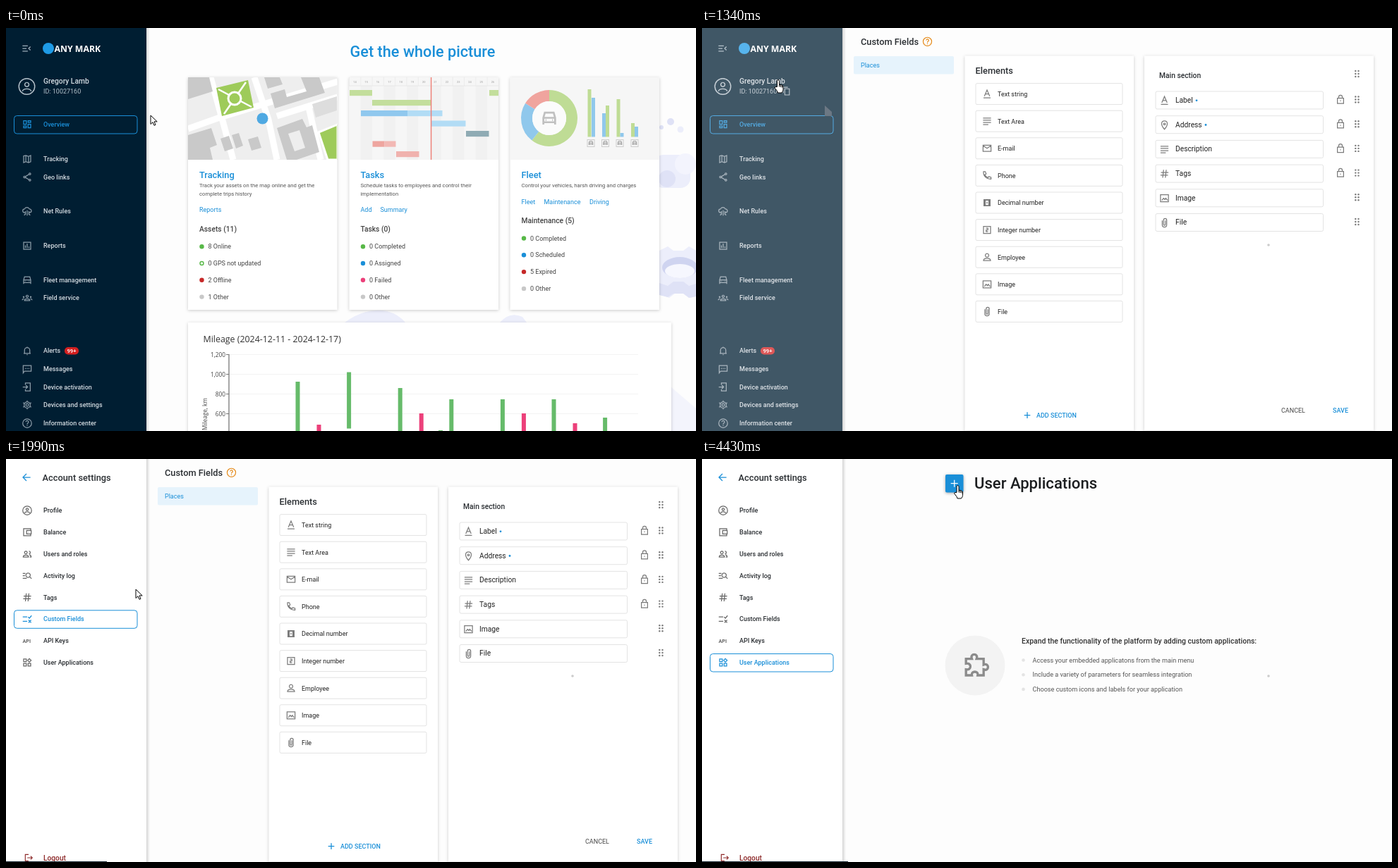
Write an HTML page that moves like this. It is 978x572 px and loops after 4490 ms.

```html
<!DOCTYPE html>
<html lang="en">
<head>
<meta charset="utf-8">
<title>Account settings walkthrough</title>
<style>
html, body { margin: 0; width: 100%; height: 100%; overflow: hidden; background: #fdfdfd; }
svg { display: block; font-family: Roboto, sans-serif; }
.card { fill: #fff; filter: drop-shadow(0 1px 2px rgba(0,0,0,.2)); }
.chart { font-family: "Open Sans", "Noto Sans", sans-serif; }
</style>
</head>
<body>
<svg id="stage" width="978" height="572" viewBox="0 0 978 572"></svg>
<script>
const BLUE = '#1a8fd8', INK = '#2b2f33', GREY = '#7c7c7c';

// 24-unit stroked icons
const icons = {
  menu: 'M3 6h12M3 12h9M3 18h12M21 8l-4 4 4 4',
  user: 'M2 12a10 10 0 1 0 20 0a10 10 0 1 0-20 0M12 7a2.6 2.6 0 1 0 .1 0M6.500 18c1-4 10-4 11 0',
  dash: 'M4 4h6v8H4zM14 4h6v4h-6zM4 16h6v4H4zM14 12h6v8h-6z',
  map: 'M4 5l5-1 6 2 5-2v14l-5 2-6-2-5 2zM9 4v14M15 6v14',
  share: 'M18 3a2 2 0 1 0 .1 0M18 17a2 2 0 1 0 .1 0M6 10a2 2 0 1 0 .1 0M8 11l8-5M8 13l8 5',
  cloud: 'M7 15H6a4 4 0 0 1 0-8a6 6 0 0 1 11 0a4 4 0 0 1 1 8h-1M12 10v12M8 12v7l-3 2M16 12v7l3 2',
  report: 'M4 4h16v16H4zM8 11v6M12 7v10M16 14v3',
  car: 'M4 21v-9l2-7h12l2 7v9M4 12h16M4 18h16M7 15h1M16 15h1',
  group: 'M12 6a2.500 2.500 0 1 0 .1 0M6 18c0-5 12-5 12 0zM4 9a1 1 0 1 0 .1 0M20 9a1 1 0 1 0 .1 0M1 17q0-3 4-3M23 17q0-3-4-3',
  bell: 'M6 18v-7a6 6 0 0 1 12 0v7M4 18h16M11 21h2M12 3v2',
  msg: 'M3 21V4h18v13H6zM7 11h2M11 11h2M15 11h2',
  door: 'M8 7V3h11v18H8v-4M2 12h11M9 8l4 4-4 4',
  gear: 'M12 9a3 3 0 1 0 .1 0M12 5a7 7 0 1 0 .1 0M12 2v3M12 19v3M3 7l3 2M18 15l3 2M3 17l3-2M18 9l3-2',
  help: 'M2 12a10 10 0 1 0 20 0a10 10 0 1 0-20 0M9 9a3 3 0 1 1 4 3q-1 1-1 2.500M12 16v2',
  copy: 'M8 6h12v16H8zM4 17V2h12',
  back: 'M21 12H4M12 4l-8 8 8 8',
  wallet: 'M20 7V4H4v16h16v-3M11 8h10v8H11zM15 12h1',
  users: 'M9 6a3 3 0 1 0 .1 0M3 19c0-6 12-6 12 0zM16 6a3 3 0 0 1 0 6M17 14q4 1 4 5h-3',
  log: 'M2 7h6M2 12h5M2 18h9M14 6a5 5 0 1 0 .1 0M18 15l4 4',
  tag: 'M4 9h17M3 15h17M10 3L8 21M16 3l-2 18',
  fields: 'M2 7h10M2 17h10M14 7l3 3 5-6M15 14l6 6M21 14l-6 6',
  apps: 'M4 4h6v6H4zM4 14h6v6H4zM14 14h6v6h-6zM17 3l4 4-4 4-4-4z',
  logout: 'M12 4H4v16h8M9 12h12M17 8l4 4-4 4',
  text: 'M6 17l6-14 6 14M8 12h8M4 21h16',
  lines: 'M3 5h18M3 10h18M3 15h18M3 20h12',
  mail: 'M3 5h18v14H3zM3 6l9 6 9-6',
  phone: 'M4 3h4l2 5-3 2q2 5 7 7l2-3 5 2v4C11 21 3 13 4 3z',
  decimal: 'M5 5h14v14H5zM8 5v14M16 5v14M9 6h6M9 18h6M6.500 5v14M17.500 5v14M12 10v4',
  integer: 'M4 4h16v16H4zM9.500 8h4.500v4h-4v4h4.500',
  person: 'M12 4a4 4 0 1 0 .1 0M4 20c0-7 16-7 16 0z',
  image: 'M3 4h18v16H3zM6 17l4-5 3 3 2-3 4 5',
  file: 'M7 7v10a5 5 0 0 0 10 0V6a3.500 3.500 0 0 0-7 0v10a1.500 1.500 0 0 0 4 0V7',
  pin: 'M12 22C2 11 5 3 12 3s10 8 0 19zM12 8a2 2 0 1 0 .1 0',
  lock: 'M5 9h14v12H5zM8 9V6a4 4 0 0 1 8 0v3M12 14v2',
  plus: 'M12 4v16M4 12h16',
  puzzle: 'M4 7h5c-2-5 6-5 4 0h6v5c5-2 5 6 0 4v5h-5c1-4-6-4-5 0H4v-5c5 1 5-6 0-5z'
};

const text = (x, y, s, size = 9, fill = INK, weight = 400, more = '') =>
  `<text x="${x}" y="${y}" font-size="${size}" fill="${fill}" font-weight="${weight}" ${more}>${s}</text>`;
const rect = (x, y, w, h, fill, more = '') =>
  `<rect x="${x}" y="${y}" width="${w}" height="${h}" fill="${fill}" ${more}/>`;
const dot = (x, y, r, fill, more = '') => `<circle cx="${x}" cy="${y}" r="${r}" fill="${fill}" ${more}/>`;
const path = (d, fill, more = '') => `<path d="${d}" fill="${fill}" ${more}/>`;
const line = (d, stroke, w) => path(d, 'none', `stroke="${stroke}" stroke-width="${w}"`);
const icon = (name, cx, cy, size, color, w = 2) =>
  path(icons[name], 'none', `stroke="${color}" stroke-width="${w}" transform="translate(${cx - size / 2} ${cy - size / 2}) scale(${size / 24})"`);
const layer = (id, body, more = '') => `<g id="${id}" ${more}>${body}</g>`;
const each = (list, f) => list.map(f).join('');
const frame = (y, h = 25.5) => rect(11.5, y, 174.5, h, 'none', `rx="4" stroke="${BLUE}"`);

function sidebar() {
  const items = [
    ['dash', 'Overview', 136.5], ['map', 'Tracking', 186], ['share', 'Geo links', 211.5],
    ['cloud', 'Net Rules', 260], ['report', 'Reports', 309], ['car', 'Fleet management', 357.5],
    ['group', 'Field service', 383], ['bell', 'Alerts', 458], ['msg', 'Messages', 484],
    ['door', 'Device activation', 509.5], ['gear', 'Devices and settings', 535], ['help', 'Information center', 561]
  ];
  return rect(0, 0, 199, 572, '#001e32') +
    icon('menu', 29, 29, 15, '#9fb0bc') + dot(60, 29, 8, '#1e9be6') +
    text(68.5, 33.5, 'ANY MARK', 12.3, '#fff', 700, 'class="chart"') +
    icon('user', 29.5, 83, 27, '#b4c0c9', 1.3) +
    text(53, 78.700, 'Gregory Lamb', 10.25, '#d3dae0', 500) +
    text(53, 93, 'ID: 10027160', 9, '#b4c0c9') +
    frame(124.5) +
    each(items, ([name, label, y], i) =>
      icon(name, 30, y, 15, i ? '#8c9ca8' : BLUE) + text(53, y + 3.3, label, 9, i ? '#d3dae0' : BLUE, 500)) +
    rect(83, 453, 20, 10.5, '#d32020', 'rx="5"') + text(93, 461.2, '99+', 7.7, '#fff', 500, 'text-anchor="middle"');
}

function cityMap() {
  const block = '#c9c9c9';
  return rect(258, 70, 212, 117, '#eee') +
    line('M258 143L300 128L470 76M352 70L372 130L384 187M290 70L308 135L322 187M384 125L470 98M428 108L446 187', '#fff', 9) +
    path('M298 85L343 74L351 113L306 125z', '#9ecb5a') +
    line('M301 87L348 112M340 77L309 122', '#fff', 2.5) +
    dot(324, 100, 9, '#9ecb5a', 'stroke="#fff" stroke-width="3"') +
    path('M258 70h30l5 20-35 11zM366 70h22l4 10-21 6zM375 93l20-6 3 11 28-8-8-20h26l8 22-71 22z', block) +
    path('M258 152l33-10 8 24-10 4 4 17h-35zM304 157l12-4 6 18-12 4zM320 152l10-3 6 18-10 4zM343 158l14-4 5 16-14 4z', block) +
    path('M384 142l36-13 6 12 8-3 10 38-32 11h-14z', block) + path('M400 150l16-5 8 25-15 5z', '#eee') +
    path('M434 108l35-11v20l-30 10z', '#ddd') +
    path('M443 148L470 137v50h-14z', '#9ecb5a', 'stroke="#fff" stroke-width="3"');
}

function gantt() {
  const bars = [
    [487, 32, 88, '#c3de9c'], [685, 13, 88, '#c3de9c'], [519, 83, 102, '#c3de9c'],
    [503, 66, 117, '#90c8ee'], [569, 49.5, 117, '#b2dcf5'], [602, 49.5, 131.5, '#b2dcf5'],
    [652, 32.5, 146, '#8fabb4'], [519.5, 17, 160.5, '#eea59f'], [536.5, 16, 160.5, '#f2b8b4'], [553, 32.5, 175, '#f0b2ae']
  ];
  let s = rect(486.5, 70, 211.5, 117, '#f6f6f6');
  for (let i = 0; i < 13; i++) {
    const x = 486.5 + i * 16.3;
    if (i % 2) s += rect(x, 82, 16.3, 105, '#f1f1f1');
    s += line(`M${x} 70v12`, '#e6e6e6', .6) + text(x + 8, 78, 14 + i, 4, '#999', 400, 'text-anchor="middle"');
  }
  return s + line('M486 82h212', '#e2e2e2', .7) +
    each(bars, ([x, w, y, c]) => rect(x, y, w, 8.2, c)) + line('M602.600 70v117', '#ef7f76', 1.4);
}

function fleet() {
  const at = a => `${770 + 32 * Math.sin(a * Math.PI / 180)} ${128 - 32 * Math.cos(a * Math.PI / 180)}`;
  const arc = (a, b, c) => line(`M${at(a)}A32 32 0 ${b - a > 180 ? 1 : 0} 1 ${at(b)}`, c, 16);
  const green = '#bfdc95', blue = '#90c8ec';
  const bars = [[824.5, 87, green], [830, 99, blue], [845, 121, blue], [850, 110, green],
    [865.5, 101, green], [870.5, 149, blue], [886, 135, green], [891, 140, blue]];
  return rect(714.5, 70, 211.5, 117, '#f6f6f6') + arc(0, 218, green) + arc(218, 302, blue) + arc(302, 360, '#f0a49e') +
    dot(770, 128, 24, '#fbfbfb') + icon('car', 770, 127.5, 25, '#c0c0c0', 2.6) +
    each(bars, ([x, y, c]) => rect(x, y, 5, 154.5 - y, c)) +
    each([829, 849.5, 870, 891], x => rect(x - 5, 158.5, 10, 10, 'none', 'stroke="#ccc"') + icon('car', x, 163, 8, '#999', 3));
}

function card(x, title, desc, links, head, items, up) {
  const top = x + 16;
  return rect(x, 70, 211.5, 330, '', 'class="card"') + text(top, 213, title, 12.8, BLUE, 500) +
    each(desc, (s, i) => text(top, 226.3 + 11.6 * i, s, 7.7, '#555')) +
    each(links, ([dx, s]) => text(top + dx, 261.2 - up, s, 9, BLUE)) +
    text(top, 288.500 - up, head, 10.25, '#444', 500) +
    each(items, ([s, c, hollow], i) => {
      const y = 310 - up + 23.8 * i;
      return dot(x + 19.5, y + .2, hollow ? 2.5 : 3.2, hollow ? '#fff' : c, hollow ? `stroke="${c}" stroke-width="1.4"` : '') +
        text(x + 28.5, y + 3.200, s, 9, '#444');
    });
}

function mileage() {
  const green = [[0, 502], [1, 488.5], [2, 511], [3, 527], [4, 527], [5, 527], [6, 553]];
  const pink = [[0, 563], [2, 547], [4, 547], [5, 561]];
  return `<g class="chart">` + rect(258, 418, 685, 160, '', 'class="card"') +
    text(279.5, 445.5, 'Mileage (2024-12-11 - 2024-12-17)', 12.4, '#333') +
    each(['1,200', '1,000', '800', '600', '400'], (s, i) => {
      const y = 463.5 + i * 28;
      return line(`M316 ${y}h580`, '#f3f3f3', 1) + line(`M312 ${y}h4`, '#777', 1) +
        text(311, y + 3, s, 8.3, '#444', 400, 'text-anchor="end"');
    }) +
    line('M316 463v120', '#777', 1.3) +
    text(0, 0, 'Mileage, km', 8.2, '#444', 400, 'transform="translate(285 571) rotate(-90)"') +
    each(green, ([i, y]) => rect(410.5 + 72.6 * i, y, 6, 80, '#66bb6a')) +
    each(pink, ([i, y]) => rect(440.5 + 72.6 * i, y, 6, 80, '#ec407a')) + rect(613, 571, 6, 2, '#66bb6a') + '</g>';
}

function backdrop() {
  const pale = '#eceefb', mid = '#dfe2f6';
  return dot(929, 141, 3, mid) + dot(942, 133, 5, mid) + dot(956, 144, 4.5, pale) +
    rect(918, 180, 52, 47, pale, 'rx="14"') + dot(963, 193, 15, '#f3f4fd') + dot(937, 214, 12, mid) +
    path('M926 316l12-6 8 6h14l8-6 14 8v62l-12 3-8-6h-14l-8 6-16-6z', pale) +
    `<ellipse cx="955" cy="340" rx="25" ry="15" fill="#cfd4f0"/><ellipse cx="955" cy="345" rx="21" ry="10" fill="#f6f7fe"/>` +
    path('M926 362l12 4 8-6h14l8 6 10-3v18l-10 2-8-6h-14l-8 5-12-3z', mid) +
    path('M480 418q30-22 60-16 16 4 26 16zM700 418q14-16 32-8l6 8z', pale) + path('M943 510l35 30v32h-35z', '#f3f4fc');
}

function dashboard() {
  const green = '#57b847', red = '#c62828', pink = '#ec407a', none = '#c8c8c8';
  return backdrop() + text(590.5, 41.2, 'Get the whole picture', 21.7, BLUE, 500, 'text-anchor="middle"') +
    card(258, 'Tracking', ['Track your assets on the map online and get the', 'complete trips history'], [[0, 'Reports']], 'Assets (11)',
      [['8 Online', green], ['0 GPS not updated', green, 1], ['2 Offline', red], ['1 Other', none]], 0) +
    card(486.500, 'Tasks', ['Schedule tasks to employees and control their', 'implementation'], [[0, 'Add'], [28, 'Summary']], 'Tasks (0)',
      [['0 Completed', green], ['0 Assigned', BLUE], ['0 Failed', pink], ['0 Other', none]], 0) +
    card(714.5, 'Fleet', ['Control your vehicles, harsh driving and charges'], [[0, 'Fleet'], [32, 'Maintenance'], [96.5, 'Driving']], 'Maintenance (5)',
      [['0 Completed', green], ['0 Scheduled', BLUE], ['5 Expired', red], ['0 Other', none]], 11.7) +
    rect(258, 70, 211.5, 117, '#fafafa') +
    layer('city', cityMap(), 'clip-path="url(#mapBox)"') + dot(363.5, 128.5, 8, '#4fa9e2') +
    gantt() + fleet() + mileage();
}

function customFields() {
  const elements = [['text', 'Text string'], ['lines', 'Text Area'], ['mail', 'E-mail'], ['phone', 'Phone'],
    ['decimal', 'Decimal number'], ['integer', 'Integer number'], ['person', 'Employee'], ['image', 'Image'], ['file', 'File']];
  const box = (x, y, w, h) => rect(x + .5, y, w, h, '#fff', 'rx="2" stroke="#e3e3e3"');
  return text(225, 23.5, 'Custom Fields', 12.8, INK, 500) + rect(215, 40, 142, 25.5, '#e6f3fc', 'rx="2"') +
    text(225, 56, 'Places', 9, BLUE) +
    rect(372.5, 39.5, 239.5, 532, '', 'class="card"') + rect(627, 39.5, 325, 532, '', 'class="card"') +
    text(387.5, 64.5, 'Elements', 12.8, INK, 500) +
    each(elements, ([name, label], i) => {
      const y = 93.6 + 38.6 * i;
      return box(387.5, y - 15, 208, 30) + icon(name, 404, y, 15, GREY) + text(419, y + 3.3, label, 9, '#222');
    }) +
    icon('plus', 461, 549.7, 13, BLUE, 2.4) + text(474, 553, 'ADD SECTION', 9, BLUE, 500);
}

function section() {
  const rows = [['text', 'Label', 701], ['pin', 'Address', 714], ['lines', 'Description'], ['tag', 'Tags'], ['image', 'Image'], ['file', 'File']];
  const grip = y => each([-4, 0, 4], d => dot(926.3, y + d, 1.2, GREY) + dot(930.500, y + d, 1.2, GREY));
  return icon('help', 319.5, 19.3, 14.500, '#e58a1a') + text(648, 71, 'Main section', 10.25, INK, 500) + grip(65) +
    each(rows, ([name, label, star], i) => {
      const y = 102.5 + 34.7 * i;
      return rect(643, y - 12.5, 237.500, 25, '#fff', 'rx="2" stroke="#e3e3e3"') + icon(name, 655.5, y + .3, 15, GREY) +
        text(671, y + 3.4, label, 10.25, '#222') + (star ? dot(star, y + .3, 1.4, BLUE) : '') +
        (i < 4 ? icon('lock', 905, y - 1, 15, GREY) : '') + grip(y - 1);
    }) +
    text(821, 546.3, 'CANCEL', 9, '#444') + text(894, 546.3, 'SAVE', 9, BLUE, 500);
}

function userApps() {
  const lines = ['Access your embedded applicatons from the main menu', 'Include a variety of parameters for seamless integration', 'Choose custom icons and labels for your application'];
  return rect(345, 22, 25.5, 25.5, BLUE, 'rx="2" style="filter:drop-shadow(0 1px 2px rgba(0,0,0,.35))"') +
    icon('plus', 357.7, 34.700, 15, '#fff') + text(386, 42.2, 'User Applications', 22.1, '#1c1e20', 500) +
    dot(387, 293, 42.5, '#f3f3f3') + icon('puzzle', 387.5, 292, 40, '#8b8b8b') +
    text(453, 261.8, 'Expand the functionality of the platform by adding custom applications:', 10.45, '#333', 500) +
    each(lines, (s, i) => dot(455.5, 285.5 + 20.7 * i, 2.3, '#e4e4e4') + text(468.5, 288.500 + 20.7 * i, s, 9.15, '#555'));
}

function settings(selected, fading) {
  const items = [['user', 'Profile'], ['wallet', 'Balance'], ['users', 'Users and roles'], ['log', 'Activity log'],
    ['tag', 'Tags'], ['fields', 'Custom Fields'], ['', 'API Keys'], ['apps', 'User Applications']];
  return icon('back', 29, 26, 15, BLUE) + text(51.5, 30.5, 'Account settings', 12.8, INK, 500) +
    frame(214.8 + (selected - 5) * 30.85) +
    each(items, ([name, label], i) => {
      const y = 73 + 30.85 * i, on = i === selected;
      let tint = on ? BLUE : '#666';
      if (fading) tint = i === 5 ? '#3579a8' : on ? '#2c5478' : tint;
      return (name ? icon(name, 30, y, 15, tint) : text(23.5, y + 2.8, 'API', 7.2, tint, 700)) +
        text(53, y + 3.2, label, 9, on ? BLUE : INK, 500);
    }) +
    icon('logout', 32, 566, 14, '#8e2a2a') + text(53, 569.700, 'Logout', 10.2, '#8e2a2a', 500);
}

stage.innerHTML =
  `<defs><clipPath id="mapBox">${rect(258, 70, 211.5, 117, '#000')}</clipPath>
  <linearGradient id="edge"><stop stop-color="#000" stop-opacity=".16"/><stop offset="1" stop-color="#000" stop-opacity="0"/></linearGradient></defs>` +
  rect(0, 0, 978, 572, '#fdfdfd') +
  layer('home', dashboard()) + layer('fieldsPage', customFields()) + layer('sectionPane', section()) +
  layer('appsPage', userApps()) + dot(803, 308, 1.8, '#ccc', 'id="spinner"') +
  rect(199, 0, 5, 572, 'url(#edge)') +
  sidebar() + layer('trace', path('M174 110l10 9v6h-10z', '#3a4a5b')) +
  layer('copyMark', icon('copy', 119.5, 89.5, 13, '#a9b5be')) +
  rect(0, 0, 199, 572, '#fff', 'id="veil"') +
  layer('menuFields', settings(5)) + layer('menuFading', settings(7, true)) + layer('menuApps', settings(7)) +
  rect(199, 0, 779, 1.5, '#4db2f0', 'id="loadBar"') + rect(0, 571, 0, 1, '#1c2a36', 'id="footBar"') +
  layer('arrow', path('M0 0v12.500l3-2.800 2 4.600 2-.9-2-4.500h4.200z', '#fff', 'stroke="#000"')) +
  layer('hand', path('M4 10V2q0-2 1.500-2T7 2v5q4-.5 5.500 2v5q0 2-2 4.500H5q0-2-4-6.500q-1-2 1-2zM7 7v3M9 7.500v3M11 8v3', '#fff', 'stroke="#000"'));

const el = id => document.getElementById(id);
const show = (id, on) => { el(id).style.display = on ? '' : 'none'; };
const fade = (id, v) => { el(id).style.opacity = v; };
const ramp = (n, a, b) => Math.min(1, Math.max(0, (n - a) / (b - a)));

// pointer keys: tick, x, y, hand?
const keys = [
  [0, 205, 124, 0], [3, 174, 110, 0], [5, 135, 88, 1], [8, 105, 75, 1], [10, 102.5, 73.5, 1], [23, 102.5, 73.5, 1],
  [25, 125, 92, 1], [28, 178, 145, 0], [30, 184, 185, 0], [31, 177, 203, 0], [33, 158, 238, 1], [38, 117.5, 292, 1],
  [53, 117.5, 292, 1], [61, 161, 264, 1], [62, 185, 240, 0], [66, 340, 60, 0], [67, 357, 37.5, 1]
];

function pointer(n) {
  let i = 0;
  while (i < keys.length - 2 && n >= keys[i + 1][0]) i++;
  const a = keys[i], b = keys[i + 1], p = ramp(n, a[0], b[0]);
  const isHand = p === 1 ? b[3] : a[3];
  show('hand', isHand);
  show('arrow', !isHand);
  el(isHand ? 'hand' : 'arrow').setAttribute('transform', `translate(${a[1] + (b[1] - a[1]) * p} ${a[2] + (b[2] - a[2]) * p})`);
}

function draw(now) {
  const n = Math.floor((now % 4490 + 20) / 66); // 15 ticks a second
  show('home', n < 16);
  fade('city', 1 - .45 * ramp(n, 0, 6));
  show('fieldsPage', n >= 18 && n < 41);
  show('sectionPane', n >= 20 && n < 41);
  show('appsPage', n >= 46);
  show('spinner', n >= 17);
  el('spinner').setAttribute('fill', n < 20 ? BLUE : '#ccc');
  show('trace', n >= 4);
  show('copyMark', n >= 6);
  fade('veil', n < 20 ? 0 : [.25, .56, .85][n - 20] ?? 1);
  show('menuFields', n >= 22 && n < 41);
  fade('menuFields', ramp(n, 21, 24));
  show('menuFading', n >= 41 && n < 46);
  show('menuApps', n >= 46);
  fade('loadBar', n < 41 ? 0 : 1 - ramp(n, 48, 51));
  el('loadBar').setAttribute('width', 779 * ramp(n, 40, 43));
  el('footBar').setAttribute('width', n < 22 ? 0 : n < 32 ? 143 : n < 62 ? 152 : 207);
  pointer(n);
}

const start = performance.now();
function loop() {
  draw(performance.now() - start);
  requestAnimationFrame(loop);
}
loop();
</script>
</body>
</html>
```
